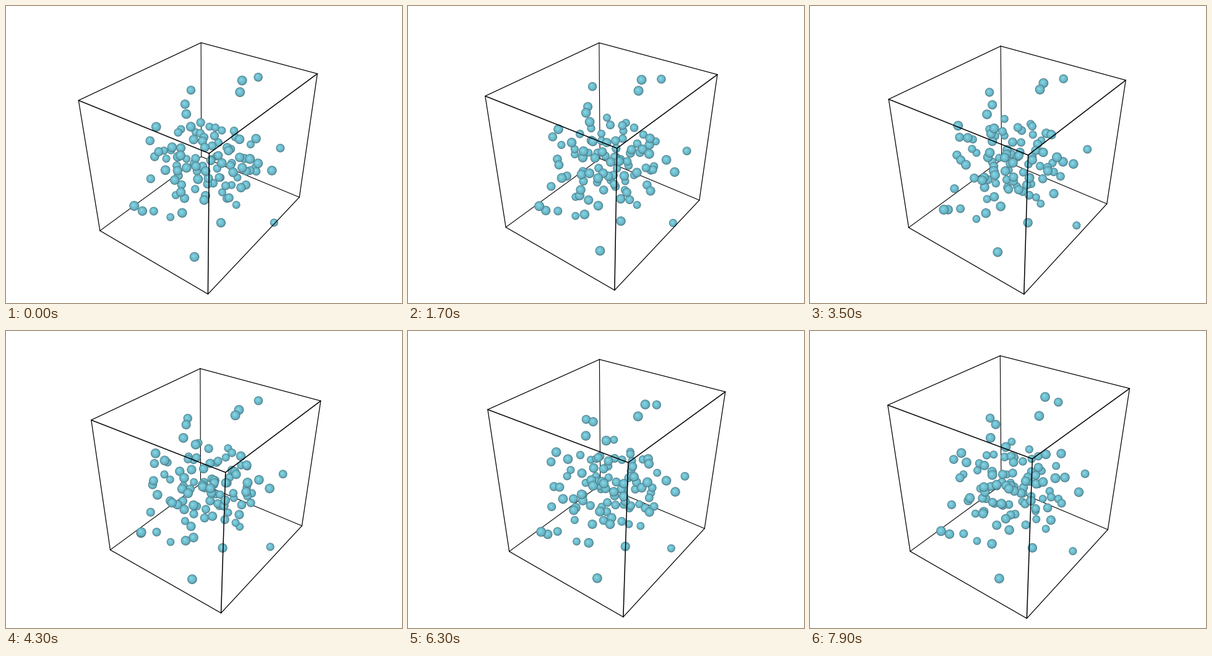
A matplotlib script that plays this animation: 640x480 px, repeating every 8 s.

```python
from itertools import combinations, product

import numpy as np
import matplotlib.pyplot as plt
from matplotlib.animation import FuncAnimation
from matplotlib.collections import LineCollection

W, H, DPI = 640, 480, 100
FRAMES, INTERVAL = 80, 100
rng = np.random.default_rng(5)

# Cell axes: depth (near to far), width (left to right), height (low to top)
SIGNS = np.array(list(product((-1, 1), repeat=3)))
SCREEN = np.array([(151, 361), (117, 152), (326, 466), (328, 239),
                   (315, 245), (315, 58), (474, 307), (502, 109)])
HIDDEN, NEAREST = 4, 3

# How far each side of the cell moves from its resting place
TIMES = [0, 17, 27, 43, 55, 63, 79]
SIDES = {
    "near": [0, .07, .075, .19, .13, .16, .16],
    "far": [0, -.07, -.01, .025, 0, 0, 0],
    "half": [0, .01, .01, .04, .11, .07, .095],
    "low": [0, 0, .08, .07, .01, .09, .10],
    "top": [0, .02, -.04, -.03, .02, .11, .16],
}

# Resting places of the loose outer particles
OUTER = np.array([
    (292, 137), (295, 151), (287, 172), (405, 116), (382, 117),
    (374, 135), (442, 231), (430, 261), (427, 351), (306, 400),
    (344, 347), (212, 324), (222, 330), (245, 326), (264, 339),
    (289, 334), (228, 285), (241, 192), (235, 214), (373, 316),
])
N_CLOUD = 86


def fit_camera(points, pixels):
    """Projective 3x4 matrix that maps the cell corners to the screen."""
    rows = []
    for p, (u, v) in zip(points, pixels):
        q, zero = np.append(p, 1), np.zeros(4)
        rows += [np.concatenate([q, zero, -u * q]),
                 np.concatenate([zero, q, -v * q])]
    return np.linalg.svd(np.array(rows))[2][-1].reshape(3, 4)


def bridge(values, step):
    """Random walk that passes through each value at its time."""
    t = np.arange(FRAMES)
    walk = np.cumsum(rng.normal(0, step, FRAMES))
    return np.interp(t, TIMES, values) + walk - np.interp(t, TIMES, walk[TIMES])


def wander(n, spread, memory=.95):
    """Brownian motion held near its resting place."""
    path = rng.normal(0, spread, (FRAMES, n, 2))
    for i in range(1, FRAMES):
        path[i] = memory * path[i - 1] + np.sqrt(1 - memory ** 2) * path[i]
    return path


def make_cloud(n):
    """Sunflower spiral, denser toward the middle."""
    k = np.arange(n) + .5
    r, a = (k / n) ** .6, k * np.pi * (3 - np.sqrt(5))
    return np.column_stack([328 + 86 * r * np.cos(a), 250 + 66 * r * np.sin(a)])


camera = fit_camera(SIGNS, SCREEN)
sides = {name: bridge(values, .014) for name, values in SIDES.items()}


def corners(i):
    near, far, half, low, top = (s[i] for s in sides.values())
    cell = np.array(list(product((-1 + near, 1 + far),
                                 (-1 - half, 1 + half),
                                 (-1 - low, 1 + top))))
    x, y, w = camera @ np.column_stack([cell, np.ones(8)]).T
    return np.column_stack([x / w, y / w])


edges = [e for e in combinations(range(8), 2)
         if np.sum(SIGNS[e[0]] != SIGNS[e[1]]) == 1]
back_edges = [e for e in edges if HIDDEN in e]
front_edges = [e for e in edges if HIDDEN not in e]

balls = np.concatenate([OUTER + wander(len(OUTER), 4),
                        make_cloud(N_CLOUD) + wander(N_CLOUD, 8)], axis=1)
radii = np.sort(rng.uniform(6.3, 8, balls.shape[1]))
balls = balls[:, rng.permutation(len(radii))]

# Sphere shading: stacked discs sliding toward the light
SIZE = np.array([1, .91, .8, .62, .4, .2])
TINT = ["#4a7680", "#5c9cab", "#68b3c4", "#70c0d1", "#78cada", "#8ad6e2"]
shift = ((1 - SIZE) * -.22)[None, :, None] * radii[:, None, None]

fig = plt.figure(figsize=(W / DPI, H / DPI), dpi=DPI, facecolor="white")
ax = fig.add_axes([0, 0, 1, 1])
ax.set(xlim=(-.5, W - .5), ylim=(H - .5, -.5))
ax.axis("off")

back = LineCollection([], colors="black", linewidths=.8, capstyle="round", zorder=1)
front = LineCollection([], colors="black", capstyle="round", zorder=3,
                       linewidths=[1.1 if NEAREST in e else .9 for e in front_edges])
ax.add_collection(back)
ax.add_collection(front)

diameters = 2 * np.outer(radii, SIZE).ravel() * 72 / DPI
spheres = ax.scatter(np.zeros(diameters.size), np.zeros(diameters.size),
                     s=diameters ** 2, c=TINT * len(radii), linewidths=0, zorder=2)


def update(i):
    box = corners(i)
    back.set_segments([box[list(e)] for e in back_edges])
    front.set_segments([box[list(e)] for e in front_edges])
    spheres.set_offsets((balls[i][:, None, :] + shift).reshape(-1, 2))
    return back, spheres, front


anim = FuncAnimation(fig, update, frames=FRAMES, interval=INTERVAL,
                     repeat=True, repeat_delay=0, blit=False)
plt.show()
```
